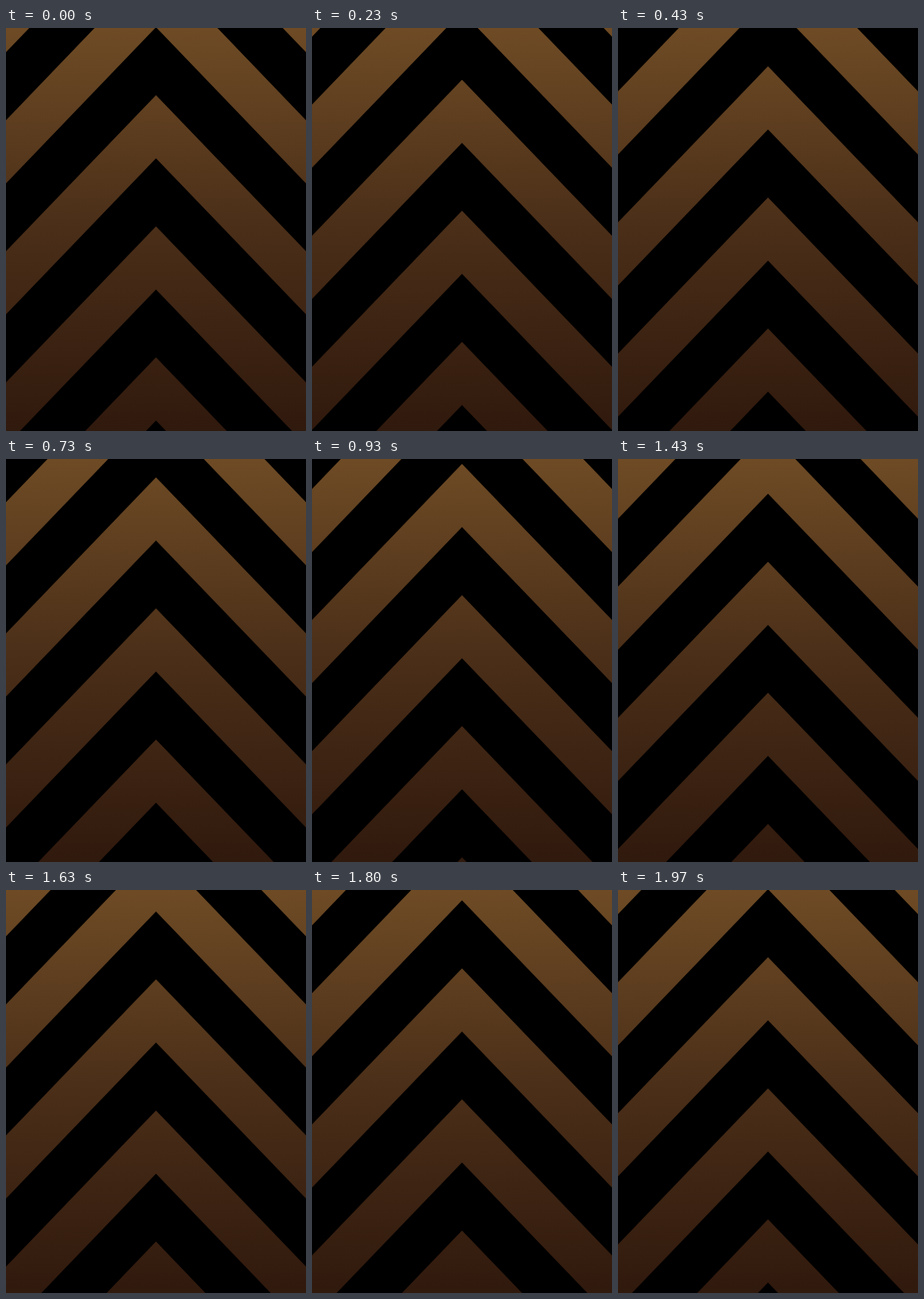
An HTML page with a canvas that plays this animation: 336 px wide and 450 px high, repeating every 2010 ms.

```html
<!DOCTYPE html>
<html lang="en">
<head>
<meta charset="utf-8">
<title>Rising chevrons</title>
<style>
  html, body { margin: 0; width: 100%; height: 100%; overflow: hidden; background: #000; }
  canvas { display: block; }
</style>
</head>
<body>
<canvas id="stage" width="336" height="450"></canvas>
<script>
const W = 336, H = 450;
const LOOP = 2010, STEP = 100 / 3, LAST = 59;
const PERIOD = 146.4, BAND = 70.5, RISE = 174.3, START = 75;

const ctx = document.getElementById('stage').getContext('2d');
const shade = ctx.createLinearGradient(0, 0, 0, H);
shade.addColorStop(0, '#6e4b25');
shade.addColorStop(0.5, '#4a2e18');
shade.addColorStop(1, '#30190d');

function chevron(tip) {
  ctx.beginPath();
  ctx.moveTo(0, tip + RISE);
  ctx.lineTo(W / 2, tip);
  ctx.lineTo(W, tip + RISE);
  ctx.lineTo(W, tip + RISE + BAND);
  ctx.lineTo(W / 2, tip + BAND);
  ctx.lineTo(0, tip + RISE + BAND);
  ctx.fill();
}

function draw(now) {
  // Steps fall on 30 fps ticks rounded to 10 ms; the last pose equals the first.
  const step = Math.min(LAST, Math.floor((now % LOOP + 5) / STEP));
  const top = START - PERIOD * (step / LAST + 2);
  ctx.fillStyle = '#000';
  ctx.fillRect(0, 0, W, H);
  ctx.fillStyle = shade;
  for (let tip = top; tip < H; tip += PERIOD) chevron(tip);
}

let start;
function tick(now) {
  start ??= now;
  draw(now - start);
  requestAnimationFrame(tick);
}
draw(0);
requestAnimationFrame(tick);
</script>
</body>
</html>
```
